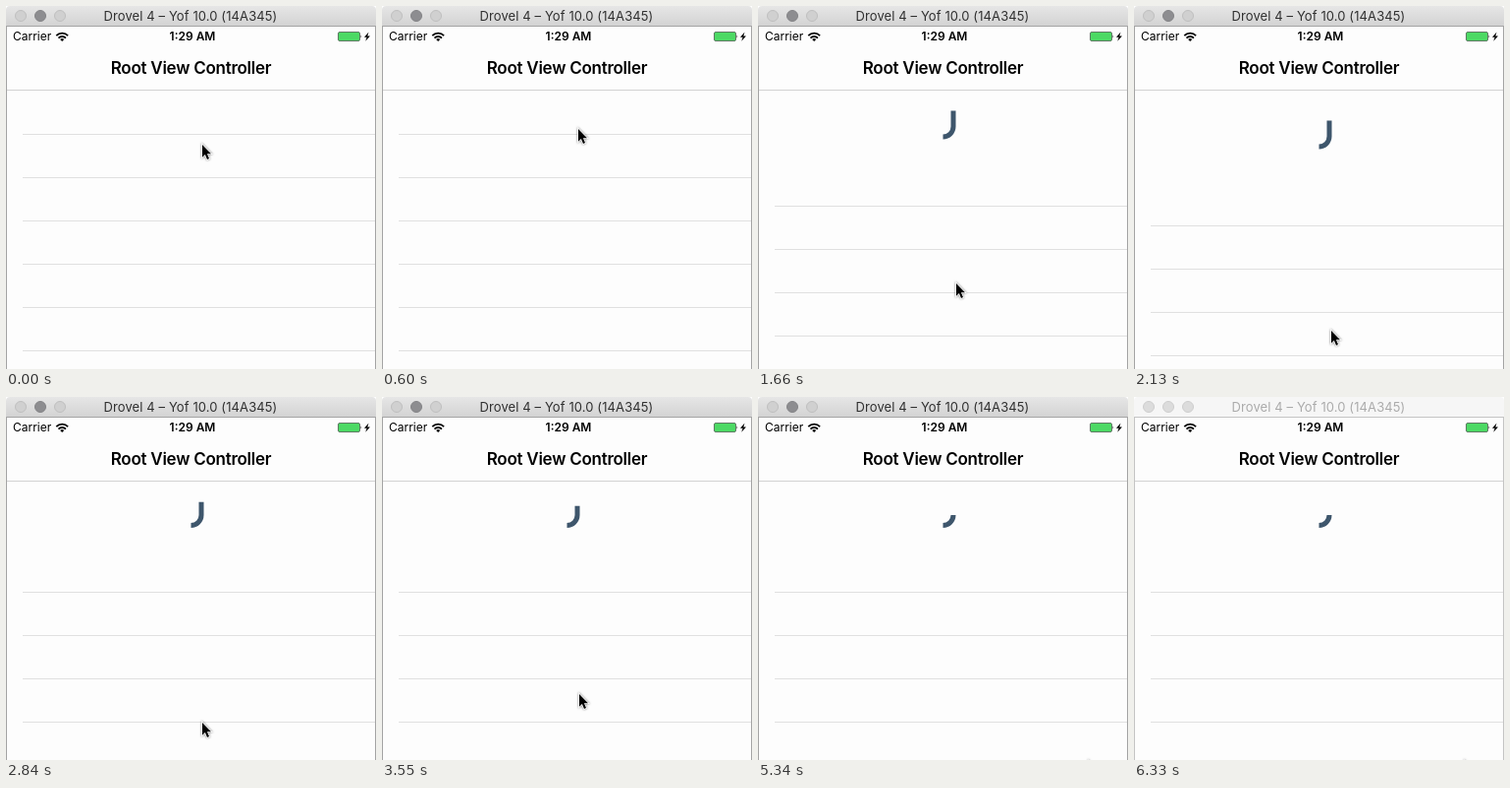
Recreate the animation shown at these times as an HTML page. Size 377 by 369 pixels, loop 6.39 s.

```html
<!DOCTYPE html>
<html lang="en">
<head>
<meta charset="utf-8">
<title>Pull to refresh</title>
<style>
  html, body { margin: 0; width: 100%; height: 100%; overflow: hidden; background: #fff; }
  svg { display: block; width: 377px; height: 369px; font-family: Inter, "Liberation Sans", sans-serif; }
  .bar { fill: url(#metal); }
  .light { fill: #d0d0d0; stroke: #bfbfbf; }
  .dark { fill: #8d8d90; stroke: #838386; }
  .caption { fill: #303030; font-size: 13px; letter-spacing: .1px; }
  .edge { fill: #a4a4a4; }
  .idle .bar { fill: #f6f6f6; }
  .idle .light { fill: #dcdcdc; stroke: #cecece; }
  .idle .caption { fill: #ababab; }
  .idle .edge { fill: #c4c4c4; }
  .status { font-size: 12px; }
  .heading { font-size: 17px; font-weight: 600; letter-spacing: -.26px; }
  #pointer { stroke: #fff; stroke-width: 1.6; paint-order: stroke; filter: drop-shadow(0 .7px .8px #0008); }
</style>
</head>
<body>
<svg id="stage" viewBox="0 0 377 369">
  <defs>
    <linearGradient id="metal" x2="0" y2="1">
      <stop stop-color="#e6e6e6"/><stop offset="1" stop-color="#d2d2d2"/>
    </linearGradient>
    <clipPath id="view"><rect x="1" y="86" width="375" height="283"/></clipPath>
  </defs>

  <rect y="20" width="377" height="349" fill="#fdfdfd"/>
  <g clip-path="url(#view)">
    <g id="rows" fill="#e0e0e0"></g>
    <path id="hook" fill="none" stroke="#3e566c" stroke-width="5"/>
  </g>

  <rect x="1" y="85" width="375" height="1" fill="#d2d2d2"/>
  <text class="heading" x="188.5" y="69" text-anchor="middle">Root View Controller</text>

  <g class="status">
    <text x="7" y="35">Carrier</text>
    <text x="190" y="35" text-anchor="middle" font-weight="600">1:29 AM</text>
  </g>
  <path d="M51.3 30.2a8.2 8.2 0 0 1 11.8 0M53.5 32.6a5.1 5.1 0 0 1 7.4 0"
        fill="none" stroke="#000" stroke-width="1.8"/>
  <path d="M57.2 36l-2-2.1a2.9 2.9 0 0 1 4 0z"/>
  <rect x="338.5" y="26.5" width="22" height="9" rx="1.5" fill="#4cd964" stroke="#5f7a64"/>
  <path d="M361.5 29.3q1.6 1.7 0 3.4z" fill="#333"/>
  <path d="M369.5 26.5l-4.5 5.2h2.6l-1.3 4.1 4.7-5.4h-2.7z"/>

  <path class="bar" d="M0 21V4a4 4 0 0 1 4-4H373a4 4 0 0 1 4 4V21z"/>
  <rect class="edge" y="20" width="377" height="1"/>
  <rect class="edge" y="21" width="1" height="348"/>
  <rect class="edge" x="376" y="21" width="1" height="348"/>
  <circle class="light" cx="15" cy="10" r="5.5"/>
  <circle class="light dark" cx="35" cy="10" r="5.5"/>
  <circle class="light" cx="55" cy="10" r="5.5"/>
  <text class="caption" x="188" y="15" text-anchor="middle">Drovel 4 – Yof 10.0 (14A345)</text>

  <path id="pointer" d="M0 0V12.8L2.9 10 5 15 7 14.1 4.9 9.3H9z"/>
</svg>
<script>
const LOOP = 6390, IDLE_AT = 6330, TICK = 118.4;
const GRAB = 7, RELEASE = 19;      // ticks
const HEADER = 68, HEIGHT = 667;   // open header, scroll view height

// Pointer way points: [tick, x, y]
const PATH = [[0, 200, 141], [GRAB, 200, 119], [10, 201, 207], [14, 202, 282], [18, 201, 330],
  [24, 200, 331], [31, 201, 297], [37, 211, 269], [44, 337, 370]];

const $ = id => document.getElementById(id);
const stage = $("stage"), rows = $("rows"), hook = $("hook"), pointer = $("pointer");

for (let y = 130; y < 369; y += 44) {
  const line = document.createElementNS(stage.namespaceURI, "rect");
  for (const [k, v] of Object.entries({ x: 17, y, width: 359, height: 1 })) line.setAttribute(k, v);
  rows.append(line);
}

function pointerAt(tick) {
  const i = PATH.findIndex(p => p[0] > tick);
  if (i < 0) return PATH[PATH.length - 1].slice(1);
  const [t0, x0, y0] = PATH[i - 1], [t1, x1, y1] = PATH[i], p = (tick - t0) / (t1 - t0);
  return [x0 + (x1 - x0) * p, y0 + (y1 - y0) * p].map(Math.round);
}

// Scroll views resist a drag past their end.
const rubber = d => HEIGHT * (1 - 1 / (1 + 0.55 * d / HEIGHT));

function pullAt(tick) {
  if (tick <= GRAB) return 0;
  const drag = rubber(pointerAt(Math.min(tick, RELEASE))[1] - 133);
  const ease = Math.exp(-0.8 * Math.max(0, tick - RELEASE));
  return Math.round(tick > RELEASE ? HEADER + (drag - HEADER) * ease : drag);
}

function draw(time) {
  const tick = Math.floor((time + 4) / TICK);
  const pull = pullAt(tick);
  // The hook follows the list until its header is open, then stays centred in the gap.
  const mid = 86 + Math.min(pull - HEADER / 2, pull / 2);
  const stem = Math.max(0, Math.min(16, (44 - tick) * 0.66));

  rows.setAttribute("transform", `translate(0 ${pull})`);
  hook.setAttribute("d", `M199 ${mid - stem}V${mid}A10.5 10.5 0 0 1 188.5 ${mid + 10.5}`);
  pointer.setAttribute("transform", `translate(${pointerAt(tick)})`);
  stage.classList.toggle("idle", time >= IDLE_AT);
}

const start = performance.now();
function frame() {
  draw((performance.now() - start) % LOOP);
  requestAnimationFrame(frame);
}
frame();
</script>
</body>
</html>
```
